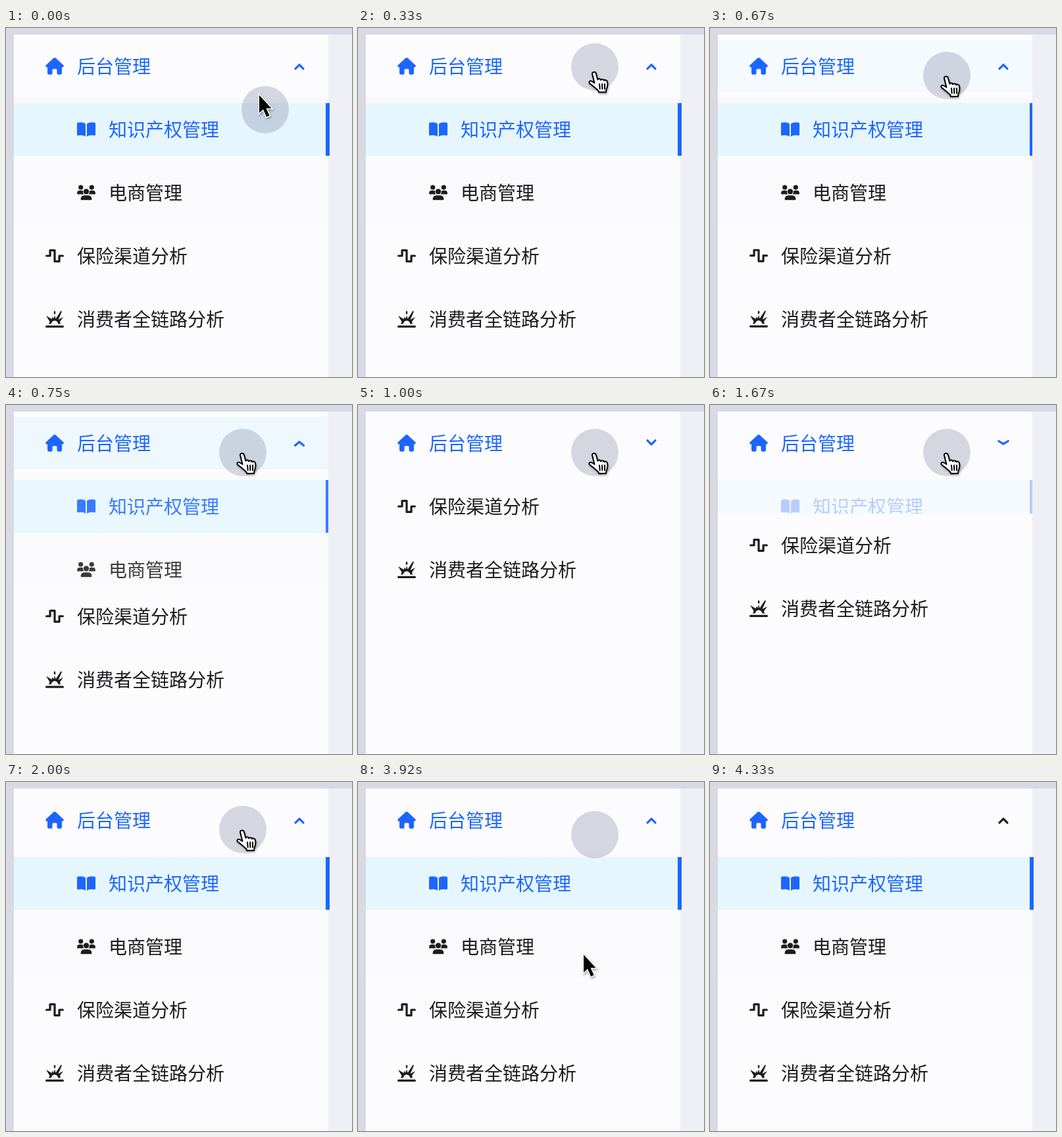
Recreate the animation shown at these times as an HTML page. Size 526 by 530 pixels, loop 4.58 s.

```html
<!DOCTYPE html>
<html lang="zh-CN">
<head>
<meta charset="utf-8">
<title>菜单</title>
<style>
  html, body { margin: 0; width: 100%; height: 100%; overflow: hidden; background: #d9d9e6; }
  svg { display: block; width: 526px; height: 530px; }
  text { font: 28px "Noto Sans CJK SC", "Noto Sans CJK", "Noto Sans", sans-serif; }
  .on { fill: #1c66ff; }
  .off { fill: #1c1c20; stroke: none; }
  .line { fill: none; stroke: #1c1c20; stroke-width: 3.2; stroke-linecap: round; stroke-linejoin: round; }
  #halo { mix-blend-mode: multiply; }
  #arrow, #hand { filter: drop-shadow(1px 2px 1.5px rgba(20, 20, 40, .35)); }
</style>
</head>
<body>
<svg viewBox="0 0 526 530">
  <defs>
    <clipPath id="clip"><rect id="window" x="12" y="106"/></clipPath>
    <path id="page" d="M-1-8.5C-4-11-9-11.2-13-10.2Q-14-10-14-9V8Q-14 9.6-12.5 9.3C-8 8.2-4 8.8-1 11Z"/>
    <g id="person">
      <circle cx="-8.3" cy="-8" r="3.6"/>
      <path d="M-14 1.2Q-14-3.2-9.5-3.2H-7.2Q-5.6-3.2-5-2.8Q-5.6 .6-3.6 2.4H-13Q-14 2.4-14 1.2Z"/>
    </g>
  </defs>

  <rect width="526" height="530" fill="#d9d9e6"/>
  <rect x="490" y="10" width="36" height="520" fill="#efeff6"/>
  <rect x="12" y="10" width="478" height="520" fill="#fcfcfe"/>
  <rect id="press" x="12" y="18" width="478" height="80" fill="#e6f6ff"/>

  <g class="on">
    <path transform="translate(74 58)" d="M0-13Q1-13 2-12L13.4-1.6Q14.6 .9 12.4 1.4H11V10Q11 12.7 8.5 12.7H5.5Q3.5 12.7 3.5 10.7V5.8Q3.5 4.2 2 4.2H-2Q-3.5 4.2-3.5 5.8V10.7Q-3.5 12.7-5.5 12.7H-8.5Q-11 12.7-11 10V1.4H-12.4Q-14.6 .9-13.4-1.6L-2-12Q-1-13 0-13Z"/>
    <text x="108" y="69">后台管理</text>
  </g>
  <path id="chevron" fill="none" stroke-width="3.2" stroke-linecap="round" stroke-linejoin="round"/>

  <g clip-path="url(#clip)">
    <g id="sub">
      <rect x="12" y="106" width="478" height="192" fill="#fafafc"/>
      <rect x="12" y="114" width="478" height="80" fill="#e6f6ff"/>
      <g class="on">
        <rect x="486" y="114" width="6" height="80"/>
        <g transform="translate(122 154)"><use href="#page"/><use href="#page" transform="scale(-1 1)"/></g>
        <text x="156" y="165">知识产权管理</text>
      </g>
      <g class="off">
        <g transform="translate(122 250)">
          <use href="#person"/><use href="#person" transform="scale(-1 1)"/>
          <circle cy="-1.6" r="4.2"/>
          <path d="M-8.4 10Q-8.2 4.2-3 4.2H3Q8.2 4.2 8.4 10Q8.4 11.2 7.2 11.2H-7.2Q-8.4 11.2-8.4 10Z"/>
        </g>
        <text x="156" y="261">电商管理</text>
      </g>
    </g>
  </g>

  <g id="rest">
    <path class="line" transform="translate(74 346)" d="M-12.4 0H-7V-8.4H0V8.4H7V0H12.4"/>
    <text class="off" x="108" y="357">保险渠道分析</text>
    <g class="line" transform="translate(74 442)">
      <path d="M-12.4 11.4H12.4"/>
      <path d="M0-11V-8.6" stroke-width="2.4"/>
      <path class="off" d="M-9 7.5L-7.5 4L-13-5L-4.5 0L-3-3.5L-1.2-.5L0-6L1.6-.5L9.5-12.5L11-11.5L5.5 1L13-3L8 4L9 7.5H5.5Q4 2.5 0 2.5Q-4 2.5-5.5 7.5Z"/>
    </g>
    <text class="off" x="108" y="453">消费者全链路分析</text>
  </g>

  <circle id="halo" r="36" fill="#d9d9e1"/>
  <path id="arrow" d="M0 0V27L6 21.5L11 33L15.5 31L10.5 20H18.5Z" fill="#000" stroke="#fff" stroke-width="3" paint-order="stroke"/>
  <g id="hand" stroke="#000" stroke-width="2" stroke-linecap="round" stroke-linejoin="round">
    <path fill="#fff" d="M-2 2C-2.3-1 3-1.6 3.8 1.5L6.5 11C7.5 9 10.5 9 11 11.5C12.5 10 15.5 10 16 12.4C17.5 11 21 11.5 21.1 15C22 19 21.5 22 19.5 26L19 30H8L7.5 28C3.5 24-.5 21-6 16.5C-8 14-5 12-2.5 13.5L1.5 16Z"/>
    <path d="M9.1 17.5L9.7 25M13.1 17.5L13.4 25M17.1 17.5V25"/>
  </g>
</svg>
<script>
const LOOP = 4580, STEP = 1000 / 12;
const BLUE = [28, 102, 255], DARK = [28, 28, 32];
const $ = id => document.getElementById(id);
const clamp = v => Math.min(1, Math.max(0, v));
const mix = (a, b, p) => a + (b - a) * p;

// Waypoints as [ms, x, y]
const pointer = [
  [0, 385, 102], [83, 366, 74], [167, 360, 64], [250, 358, 64], [420, 358, 71], [580, 358, 74],
  [3833, 358, 74], [3917, 343, 263], [4000, 326, 470], [4083, 318, 620]
];
const follower = [
  [0, 394, 124], [83, 378, 92], [167, 366, 66], [250, 361, 56], [333, 360, 59], [417, 360, 65],
  [500, 360, 70], [583, 360, 72], [3833, 360, 72], [3917, 360, 80], [4000, 350, 200],
  [4083, 336, 355], [4167, 324, 490], [4250, 316, 600]
];

function along(path, t) {
  const i = path.findIndex(p => p[0] > t);
  if (i < 0) return path[path.length - 1].slice(1);
  const a = path[i - 1], b = path[i], p = (t - a[0]) / (b[0] - a[0]);
  return [mix(a[1], b[1], p), mix(a[2], b[2], p)];
}

// cubic-bezier(.645, .045, .355, 1)
function ease(x) {
  if (x <= 0 || x >= 1) return clamp(x);
  const curve = (s, a, b) => 3 * a * s * (1 - s) ** 2 + 3 * b * s * s * (1 - s) + s ** 3;
  let lo = 0, hi = 1;
  for (let i = 0; i < 24; i++) {
    const mid = (lo + hi) / 2;
    if (curve(mid, .645, .355) < x) lo = mid; else hi = mid;
  }
  return curve(lo, .045, 1);
}

const opened = t => t < 1300 ? 1 - ease((t - 660) / 300) : ease((t - 1541.7) / 300);
const pulse = (t, from) => clamp(1 - Math.abs(t - from - 80) / 80);
const place = (el, [x, y]) => el.setAttribute("transform", `translate(${x} ${y})`);

function drawChevron(t) {
  const open = opened(t - 30), angle = (2 * open - 1) * Math.PI / 4;
  const x = 8.5 * Math.cos(angle), y = mix(59.8, 55.8, open), tip = y + 8.5 * Math.sin(angle);
  const fade = clamp((t - 3920) / 400);
  const color = BLUE.map((c, i) => Math.round(mix(c, DARK[i], fade)));
  $("chevron").setAttribute("d", `M${446 - x} ${tip}L446 ${y}L${446 + x} ${tip}`);
  $("chevron").setAttribute("stroke", `rgb(${color})`);
}

function draw(t) {
  const open = opened(t), moving = t > 660 && t < 1990;
  $("window").setAttribute("width", moving ? 478 : 480);
  $("window").setAttribute("height", 192 * open);
  $("sub").setAttribute("opacity", open);
  $("press").setAttribute("opacity", Math.max(pulse(t, 640), pulse(t, 1475)));
  place($("rest"), [0, 192 * (open - 1)]);
  drawChevron(t);

  const tip = along(pointer, t), hover = tip[1] < 98;
  place($("halo"), along(follower, t));
  place($("arrow"), tip);
  place($("hand"), tip);
  $("arrow").style.display = hover ? "none" : "";
  $("hand").style.display = hover ? "" : "none";
}

const start = performance.now();
function tick() {
  const t = (performance.now() - start) % LOOP;
  draw(Math.floor((t + 3.4) / STEP) * STEP);
  requestAnimationFrame(tick);
}
tick();
</script>
</body>
</html>
```
